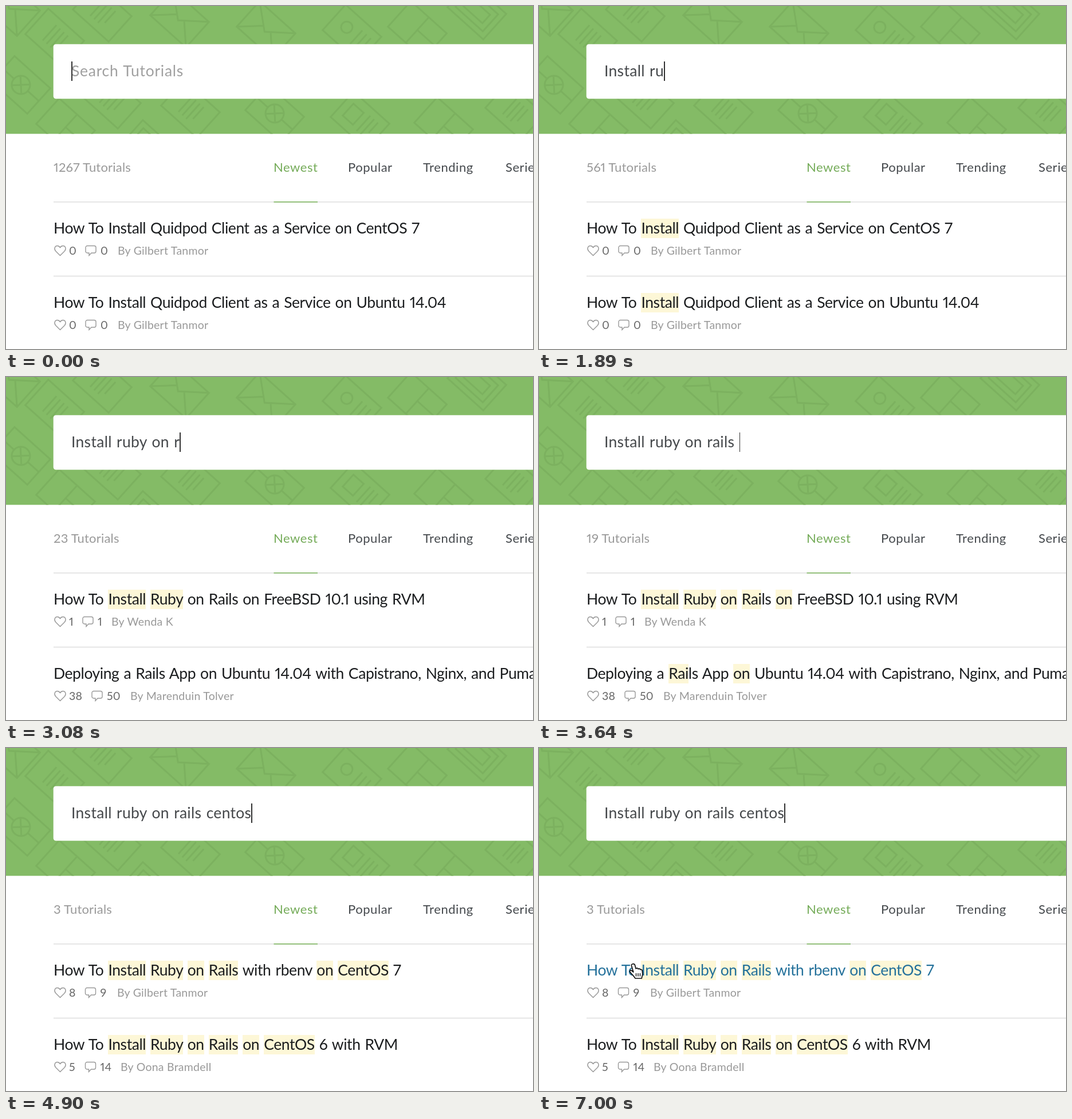
These frames come from a looping animation (920 by 600 pixels, 7.07 s). An HTML page:

```html
<!DOCTYPE html>
<html lang="en">
<head>
<meta charset="utf-8">
<title>Tutorial search</title>
<style>
  html, body { margin: 0; width: 100%; height: 100%; overflow: hidden; background: #fff; }
  #stage { position: relative; width: 920px; height: 600px; overflow: hidden;
    font-family: Lato, "Open Sans", sans-serif; font-variant-numeric: proportional-nums; }
  #stage > svg { position: absolute; left: 0; top: 0; }
  /* The top of each text is its baseline. */
  .text { position: absolute; margin-top: -.987em; line-height: 1.2; white-space: pre; }
  .search { font-size: 26.5px; letter-spacing: .3px; word-spacing: 1.2px; color: #45484b; }
  .hint { letter-spacing: .74px; color: #a0a0a0; }
  .tab { font-size: 22px; letter-spacing: .55px; color: #45494d; }
  .count { letter-spacing: .2px; color: #999; }
  .on { color: #74ab58; }
  .title { font-size: 26.5px; letter-spacing: -.42px; word-spacing: 1.6px; color: #1b1d1f; }
  .title.hover { color: #24719b; }
  .meta { font-size: 19.5px; letter-spacing: .25px; color: #999; }
  .num { color: #666; }
  mark { background: #fdf7d7; color: inherit; padding: 0 0 2px; }
  #caret { position: absolute; width: 1.5px; height: 34px; margin-top: -1px; background: #333; }
</style>
</head>
<body>
<div id="stage">
  <svg width="920" height="600" fill="none">
    <rect width="920" height="223.6" fill="#84bb66"/>
    <svg width="920" height="223.6"><g id="pattern" stroke="#7cb15f" stroke-width="3"></g></svg>
    <rect x="82.700" y="66.700" width="850" height="95.500" rx="4.500" fill="#fff"/>
    <path d="M83 342.700H920M83 472.500H920" stroke="#dedede" stroke-width="1.400"/>
    <path d="M467.500 342.700H544" stroke="#74b055" stroke-width="1.600"/>
  </svg>
  <div id="labels"></div>
  <div class="text search hint" id="hint" style="left:114px;top:124px">Search Tutorials</div>
  <div class="text search" style="left:114px;top:124px"><span id="typed"></span><b id="caret"></b></div>
  <div id="results"></div>
  <svg width="920" height="600"><g id="pointer" stroke-linejoin="round">
    <path id="arrow" d="M0 0v22l5-5 4 9 4-2-4-8h7z" fill="#111" stroke="#fff" stroke-width="1.5"/>
    <g id="hand" fill="#fff" stroke="#111" stroke-width="1.7">
      <path d="M6 1c2-1 4 0 4.5 2l1.6 6c1.5-1.3 3.4-1 4 .6c1.5-1 3.2-.5 3.8 1c1.7-.6 3.1.3 3.3 2l.6 5c.2 3-1.2 4.6-1.5 8.4H11c-1-3-6-7-9.3-11.5c-1-2 1.5-3.5 3.2-2l2.9 2.5l-3.4-11.5c-.4-1.3.4-2.2 1.6-2.5z"/>
      <path d="M12.5 17v5.5M16 17v5.5M19.5 17v5.5" stroke-width="1.4"/>
    </g>
  </g></svg>
</div>
<script>
const LOOP = 7070, STEP = 70, QUERY = 'Install ruby on rails centos';
const $ = id => document.getElementById(id);
const text = (cls, x, y, s) => `<div class="text ${cls}" style="left:${x}px;top:${y}px">${s}</div>`;

// Header pattern: tilted cards, each with one kind of drawing.
const inside = {
  lines: 'M-12-18V18M-3-18V18M6-18V18M15-18V10',
  mail: 'M-42-30L0 4L42-30M-42 30L-8-3M42 30L8-3',
  person: 'M-24-2a10 10 0 1 0 20 0a10 10 0 1 0-20 0M10-16V16M20-16V16M30-16V6',
  wheel: 'M-16 0a16 16 0 1 0 32 0a16 16 0 1 0-32 0M-11-11L11 11M11-11L-11 11M-42 0H-16M16 0H42',
  split: 'M0-30V30M0 0H42',
  nest: 'M-32-20H32V20H-32zM-22-10H22V10H-22z',
  photo: 'M-28-14H-4V14H-28zM8-18V18M17-18V18M26-18V6'
};
const cards = [
  [8, 2, 'mail'], [85, 55, 'lines'], [168, 12, 'lines'], [303, 22, 'mail'], [454, 42, 'mail'],
  [604, 48, 'person'], [718, 42, 'split'], [822, 8, 'nest'], [26, 138, 'wheel'], [184, 164, 'lines'],
  [104, 212, 'split'], [322, 180, 'lines'], [469, 188, 'wheel'], [618, 200, 'photo'],
  [764, 210, 'split'], [888, 184, 'lines'], [250, 250, 'nest']
];
$('pattern').innerHTML = cards.map(([x, y, kind]) =>
  `<path transform="translate(${x} ${y}) rotate(42)" d="M-42-30H42V30H-42z${inside[kind]}"/>`).join('');

$('labels').innerHTML = text('tab on', 467, 291, 'Newest') + text('tab', 597, 291, 'Popular') +
  text('tab', 728, 291, 'Trending') + text('tab', 872, 291, 'Series');

// When each character of the query is typed.
const keys = [280, 420, 560, 700, 840, 1190, 1330, 1470, 1680, 1820, 1960, 2100, 2520, 2660,
  2800, 2940, 3080, 3220, 3290, 3360, 3500, 3570, 3710, 3780, 3920, 4130, 4410, 4620];

// [time, characters searched, tutorials found, result page]
const searches = [
  [0, 0, 1267, 0], [770, 3, 561, 0], [910, 4, 561, 0], [1050, 5, 561, 0], [1470, 7, 561, 0],
  [2100, 10, 23, 1], [2310, 12, 23, 1], [3150, 15, 19, 1], [3430, 17, 19, 1], [3570, 19, 19, 1],
  [3780, 21, 19, 1], [3990, 23, 3, 2], [4130, 24, 3, 2], [4270, 25, 3, 2], [4620, 26, 3, 2], [4900, 28, 3, 2]
];

// [title, likes, comments, author, bubble x, author x]
const pages = [
  [['How To Install Quidpod Client as a Service on CentOS 7', 0, 0, 'Gilbert Tanmor', 138, 195],
   ['How To Install Quidpod Client as a Service on Ubuntu 14.04', 0, 0, 'Gilbert Tanmor', 138, 195]],
  [['How To Install Ruby on Rails on FreeBSD 10.1 using RVM', 1, 1, 'Wenda K', 133, 184],
   ['Deploying a Rails App on Ubuntu 14.04 with Capistrano, Nginx, and Puma', 38, 50, 'Marenduin Tolver', 149, 217]],
  [['How To Install Ruby on Rails with rbenv on CentOS 7', 8, 9, 'Gilbert Tanmor', 137.5, 194],
   ['How To Install Ruby on Rails on CentOS 6 with RVM', 5, 14, 'Oona Bramdell', 137.5, 200]]
];

const icons = (x, y) => `<svg width="920" height="600" style="position:absolute;left:0;top:0" fill="none" stroke="#999" stroke-width="1.4">
  <path transform="translate(94.5 ${y})" d="M0 8.5L-8 .5C-11.5-4-8.5-8.5-5-8.5C-2.5-8.5-1-7 0-5.5C1-7 2.5-8.5 5-8.5C8.5-8.5 11.5-4 8 .5z"/>
  <path transform="translate(${x} ${y})" d="M4-8.5h12a3 3 0 0 1 3 3v6.5a3 3 0 0 1-3 3h-5l-4 4.5v-4.5h-3a3 3 0 0 1-3-3v-6.5a3 3 0 0 1 3-3z"/></svg>`;

function highlight(title, query) {
  if (!query) return title;
  const words = query.trim().split(' ').join('|');
  return title.replace(new RegExp(`\\b(${words})`, 'gi'), '<mark>$1</mark>');
}

function row([title, likes, comments, author, bubble, name], i, query, hover) {
  const y = 399 + i * 130;
  return text('title' + (hover && !i ? ' hover' : ''), 83, y, highlight(title, query)) +
    icons(bubble, y + 29) + text('meta num', 110, y + 36, likes) +
    text('meta num', bubble + 27, y + 36, comments) + text('meta', name, y + 36, 'By ' + author);
}

let shown;
function draw(t) {
  const typed = keys.filter(k => k <= t).length;
  $('typed').textContent = QUERY.slice(0, typed);
  $('hint').style.display = typed ? 'none' : '';
  const caretOff = (t >= 5460 && t < 6020) || (t >= 6510 && t < 7000);
  $('caret').style.visibility = caretOff ? 'hidden' : '';

  // The pointer slides in from the left and slows down on the first title.
  const p = Math.min(1, Math.max(0, (t - 5880) / 630)), e = 1 - (1 - p) ** 2;
  const x = -38 + 195 * e, y = 520 - 143 * e;
  const hover = t >= 5950 && x >= 77 && y < 407;
  $('pointer').setAttribute('transform', `translate(${x} ${y})`);
  $('pointer').style.display = t >= 5950 ? '' : 'none';
  $('arrow').style.display = hover ? 'none' : '';
  $('hand').style.display = hover ? '' : 'none';

  const [, length, found, page] = searches.filter(s => s[0] <= t).pop();
  const state = length + ' ' + hover;
  if (state === shown) return;
  shown = state;
  $('results').innerHTML = text('tab count', 83, 291, found + ' Tutorials') +
    pages[page].map((r, i) => row(r, i, QUERY.slice(0, length), hover)).join('');
}

const start = performance.now();
function tick() {
  const t = (performance.now() - start) % LOOP;
  draw(t - t % STEP);
  requestAnimationFrame(tick);
}
tick();
</script>
</body>
</html>
```
